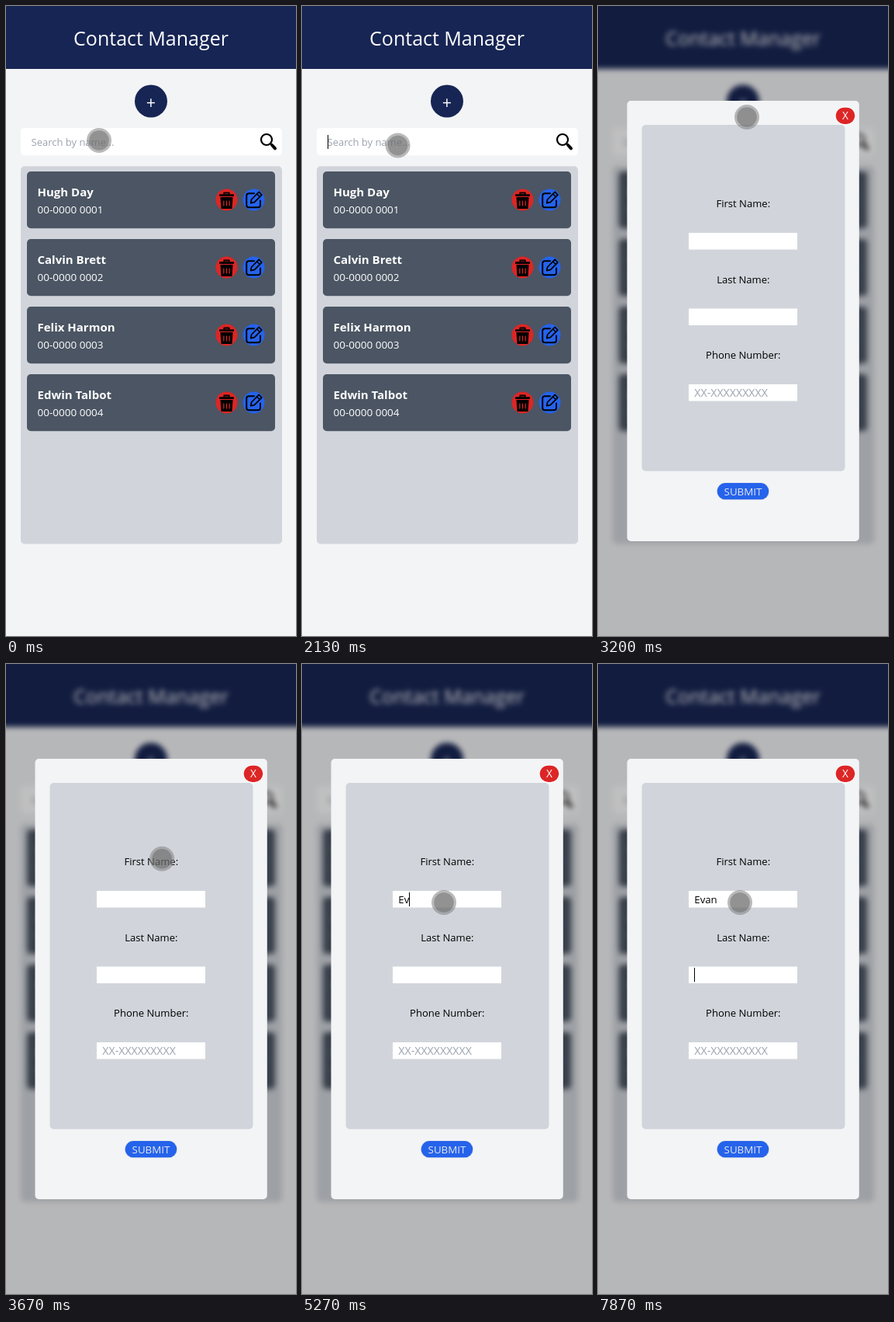
An HTML page with a canvas that plays this animation: 374 by 811 pixels, repeating every 8000 ms.

```html
<!DOCTYPE html>
<html lang="en">
<head>
<meta charset="utf-8">
<title>Contact Manager</title>
<style>
  html, body { margin: 0; width: 100%; height: 100%; overflow: hidden; background: #f3f4f6; }
  canvas { display: block; }
</style>
</head>
<body>
<canvas id="stage" width="374" height="811"></canvas>
<script>
const W = 374, H = 811, PAD = 24, LOOP = 8000, TICK = 1000 / 15;
const FONT = '"Open Sans", "Noto Sans", sans-serif';
const NAVY = '#172554', PAGE = '#f3f4f6', PANEL = '#d1d5db', CARD = '#4b5563';
const RED = '#dc2626', BLUE = '#2563eb', HINT = '#9ca3af';

const contacts = [
  ['Hugh Day', '00-0000 0001'],
  ['Calvin Brett', '00-0000 0002'],
  ['Felix Harmon', '00-0000 0003'],
  ['Edwin Talbot', '00-0000 0004']
];
const typed = 'Evan';
const keyTimes = [5000, 5270, 5600, 5800];

// Times between which each text caret is lit
const searchCaret = [[670, 1200], [1670, 2200], [2730, 3200]];
const firstCaret = [[4130, 4670], [5000, 6330], [6800, 6870]];
const lastCaret = [[6870, 7400], [7870, 8000]];

// Pointer moves: first tick, last tick, start, control, end, easing
const smooth = p => p * p * (3 - 2 * p);
const easeOut = p => 1 - (1 - p) ** 1.8;
const moves = [
  [31, 35, [120, 173], [123, 183], [133, 183], easeOut],
  [36, 43, [133, 183], [155, 193], [192, 143], smooth],
  [50, 58, [192, 143], [223, 215], [183, 307], smooth]
];

const ctx = document.getElementById('stage').getContext('2d');

function layer(w, h) {
  const c = document.createElement('canvas');
  c.width = w;
  c.height = h;
  return c;
}

function box(g, x, y, w, h, r, fill) {
  g.fillStyle = fill;
  g.beginPath();
  g.roundRect(x, y, w, h, r);
  g.fill();
}

function disc(g, x, y, r, fill) {
  g.fillStyle = fill;
  g.beginPath();
  g.arc(x, y, r, 0, Math.PI * 2);
  g.fill();
}

function text(g, str, x, y, size, color, align = 'left', weight = 400) {
  g.font = `${weight} ${size}px ${FONT}`;
  g.textAlign = align;
  g.fillStyle = color;
  g.fillText(str, x, y);
}

function line(g, width, ...pts) {
  g.lineWidth = width;
  g.beginPath();
  pts.forEach(([x, y]) => g.lineTo(x, y));
  g.stroke();
}

function trash(g, x, y) {
  disc(g, x, y, 14, RED);
  g.strokeStyle = '#000';
  g.lineWidth = 1.8;
  g.strokeRect(x - 3.2, y - 9, 6.4, 3);
  box(g, x - 9.5, y - 7.3, 19, 2.8, 1, '#000');
  g.beginPath();
  g.moveTo(x - 8, y - 3.5);
  g.lineTo(x + 8, y - 3.5);
  g.lineTo(x + 7, y + 11.5);
  g.lineTo(x - 7, y + 11.5);
  g.fill();
  for (const dx of [-3.7, 0, 3.7]) box(g, x + dx - 0.6, y + 1, 1.2, 7, 0.5, RED);
}

function pencil(g, x, y) {
  disc(g, x, y, 14, BLUE);
  g.strokeStyle = '#000';
  g.lineWidth = 2;
  g.lineCap = 'round';
  g.lineJoin = 'round';
  g.beginPath();
  g.moveTo(x + 0.5, y - 8.3);
  g.arcTo(x - 9.3, y - 8.3, x - 9.3, y, 3);
  g.arcTo(x - 9.3, y + 9.7, x, y + 9.7, 3);
  g.arcTo(x + 8.5, y + 9.7, x + 8.5, y, 3);
  g.lineTo(x + 8.5, y + 1);
  g.stroke();
  g.save();
  g.translate(x + 2.5, y - 2.2);
  g.rotate(-Math.PI / 4);
  g.lineWidth = 1.7;
  g.beginPath();
  g.moveTo(-9, 0);
  g.lineTo(-5, -2.6);
  g.lineTo(8.5, -2.6);
  g.lineTo(8.5, 2.6);
  g.lineTo(-5, 2.6);
  g.closePath();
  g.stroke();
  line(g, 1.5, [5, -2.6], [5, 2.6]);
  g.restore();
}

function magnifier(g) {
  g.strokeStyle = '#000';
  g.lineCap = 'round';
  g.lineWidth = 2.2;
  g.beginPath();
  g.arc(336, 172, 7, 0, Math.PI * 2);
  g.stroke();
  line(g, 2, [341, 177], [343, 179]);
  line(g, 4, [343, 179], [347, 183.3]);
}

function drawPage(g) {
  g.fillStyle = PAGE;
  g.fillRect(-PAD, -PAD, W + 2 * PAD, H + 2 * PAD);
  g.fillStyle = NAVY;
  g.fillRect(-PAD, -PAD, W + 2 * PAD, 81 + PAD);
  text(g, 'Contact Manager', 187, 51, 25, '#fff', 'center');

  disc(g, 187, 122.5, 21, NAVY);
  text(g, '+', 187, 132.2, 21.5, '#fff', 'center');

  box(g, 19, 157, 337, 35.5, 5, '#fff');
  text(g, 'Search by name...', 32.5, 180, 13, HINT);
  magnifier(g);

  box(g, 19, 206.3, 337, 486.2, 5, PANEL);
  contacts.forEach(([name, phone], i) => {
    const y = 213 + 87 * i;
    box(g, 27, y, 320, 73.3, 5, CARD);
    text(g, name, 40.5, y + 32, 15, '#fff', 'left', 700);
    text(g, phone, 40.5, y + 54, 13.5, '#fff');
    trash(g, 284.5, y + 36.5);
    pencil(g, 319.5, y + 36.5);
  });
}

function drawModal(g) {
  box(g, 37.5, 122, 299.3, 567, 5, PAGE);
  box(g, 56.5, 153, 262, 445.7, 5, PANEL);
  box(g, 305.8, 129.8, 26.4, 23, 11.5, '#fff');
  box(g, 306.7, 130.7, 24.6, 21.2, 10.6, RED);
  text(g, 'X', 319, 146, 13.7, '#fff', 'center');

  ['First Name:', 'Last Name:', 'Phone Number:'].forEach((label, i) => {
    const y = 97.5 * i;
    text(g, label, 187.3, Math.round(259 + y), 13.05, '#000', 'center');
    box(g, 117, 292 + y, 140, 21.4, 0, '#fff');
  });
  text(g, 'XX-XXXXXXXXX', 124.3, 503, 14.2, HINT);

  box(g, 152.8, 613.2, 68.4, 23, 11.5, '#e5e7eb');
  box(g, 153.7, 614.1, 66.6, 21.2, 10.6, BLUE);
  text(g, 'SUBMIT', 187, 630, 13.35, '#e5e7eb', 'center');
}

function touch(x, y) {
  disc(ctx, x, y, 16, 'rgba(130,130,130,0.55)');
  ctx.save();
  ctx.globalCompositeOperation = 'source-over';
  disc(ctx, x, y, 12.8, 'rgba(90,90,90,0.42)');
  ctx.restore();
}

function moveCross(x, y) {
  const arm = [[1.8, -1.8], [1.8, -8], [6, -8], [0, -14], [-6, -8], [-1.8, -8]];
  ctx.beginPath();
  for (let k = 0; k < 4; k++) {
    const c = Math.round(Math.cos(k * Math.PI / 2)), s = Math.round(Math.sin(k * Math.PI / 2));
    const pts = k ? arm : arm;
    // walk each arm from its left side to its right side
    [...pts].reverse().forEach(([px, py]) => ctx.lineTo(x + px * c - py * s, y + px * s + py * c));
  }
  ctx.closePath();
  ctx.lineJoin = 'miter';
  ctx.strokeStyle = '#fff';
  ctx.lineWidth = 2;
  ctx.stroke();
  ctx.fillStyle = '#000';
  ctx.fill();
}

function pointer(tick) {
  let pos = moves[0][2];
  for (const [from, to, a, b, c, ease] of moves) {
    if (tick < from) break;
    const u = ease(Math.min(1, (tick - from) / (to - from))), v = 1 - u;
    pos = a.map((p, i) => v * v * p + 2 * u * v * b[i] + u * u * c[i]);
  }
  return pos;
}

const lit = (spans, t) => spans.some(([on, off]) => t >= on && t < off);

function caret(x, y) {
  ctx.fillStyle = '#000';
  ctx.fillRect(Math.round(x), y, 1, 18);
}

const pageLayer = layer(W + 2 * PAD, H + 2 * PAD);
const pageCtx = pageLayer.getContext('2d');
pageCtx.translate(PAD, PAD);
drawPage(pageCtx);

const formLayer = layer(W, H);
const formCtx = formLayer.getContext('2d');
formCtx.filter = 'blur(3.5px)';
formCtx.drawImage(pageLayer, -PAD, -PAD);
formCtx.filter = 'none';
formCtx.fillStyle = 'rgba(0,0,0,0.25)';
formCtx.fillRect(0, 0, W, H);
drawModal(formCtx);

function draw(t) {
  const [x, y] = pointer(Math.floor((t + 4) / TICK));
  if (t < 3200) {
    ctx.drawImage(pageLayer, -PAD, -PAD);
    if (lit(searchCaret, t)) caret(33, 166);
  } else {
    ctx.drawImage(formLayer, 0, 0);
    const value = typed.slice(0, keyTimes.filter(k => t >= k).length);
    text(ctx, value, 124.3, 308, 13.2, '#000');
    if (lit(firstCaret, t)) caret(124.3 + ctx.measureText(value).width, 294);
    if (lit(lastCaret, t)) caret(124, 391);
  }
  if (t >= 4530 && t < 5070) moveCross(186, 310);
  else touch(x, y);
}

const start = performance.now();
function frame() {
  draw((performance.now() - start) % LOOP);
  requestAnimationFrame(frame);
}
frame();
</script>
</body>
</html>
```
